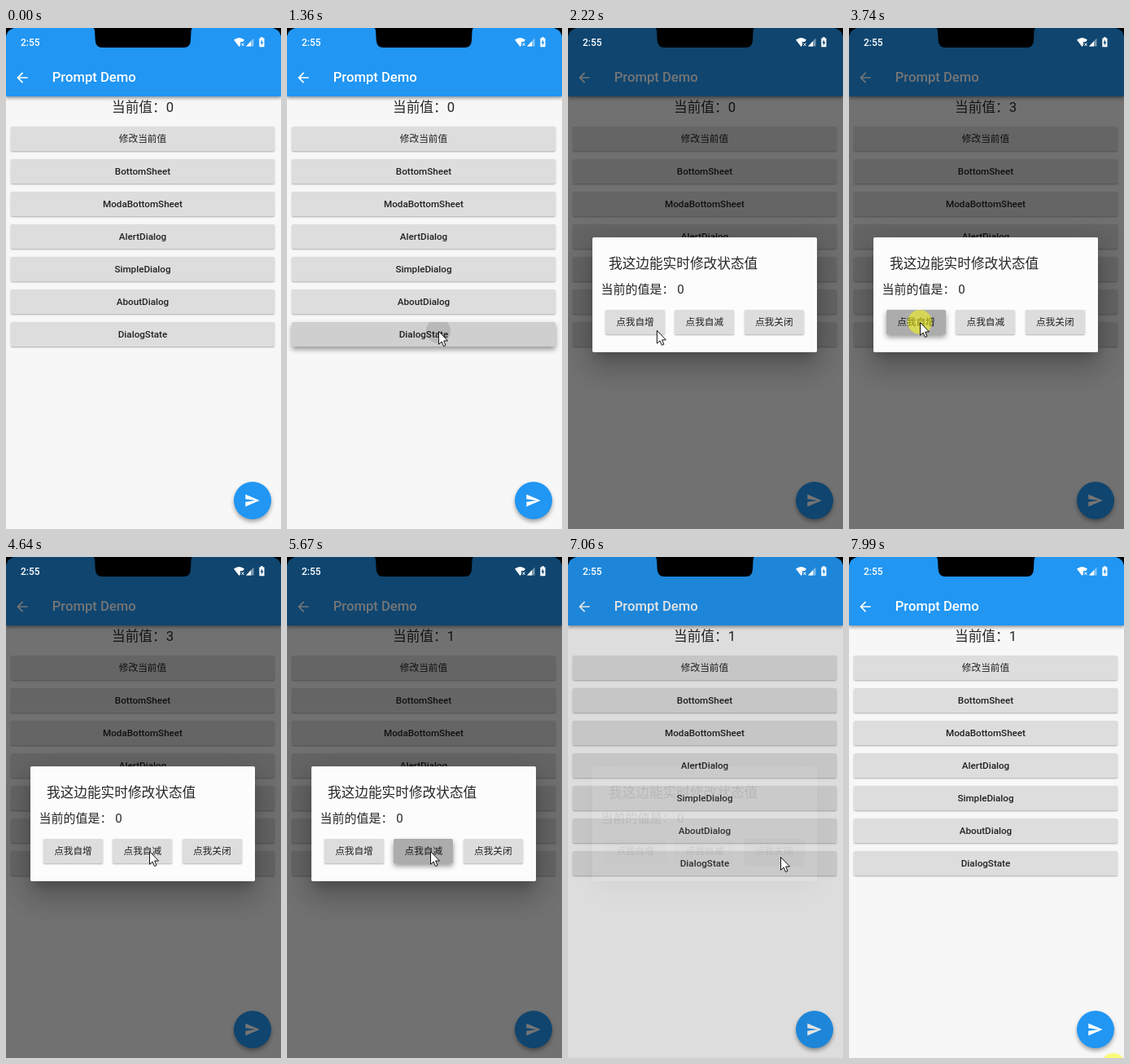
An HTML page for the animation above (8220 ms loop, 338x615 px).

```html
<!DOCTYPE html>
<html lang="zh-CN">
<head>
<meta charset="utf-8">
<title>Prompt Demo</title>
<style>
html, body { margin: 0; width: 100%; height: 100%; overflow: hidden; background: #f7f7f7; }
body { font-family: Roboto, "Noto Sans CJK SC", "Noto Sans CJK", sans-serif; color: rgba(0,0,0,.85); }
#stage { position: relative; width: 338px; height: 615px; overflow: hidden; background: #f7f7f7; }
#stage div, #stage svg { position: absolute; white-space: pre; }
.layer { left: 0; top: 0; width: 338px; height: 615px; }
.bar { left: 0; top: 0; width: 338px; height: 84px; background: #2196f3; box-shadow: 0 2px 4px rgba(0,0,0,.42); }
.title { left: 56.7px; top: 51px; font: 500 16.67px/20px Roboto, sans-serif; color: #fff; }
.big { font-size: 16.67px; line-height: 20px; }
.value { left: 0; width: 336px; top: 87.5px; text-align: center; }
.button { height: 30px; line-height: 30px; font-size: 11.67px; text-align: center;
  border-radius: 1.7px; background: #ddd; overflow: hidden; }
.latin { font-weight: 500; }
.fab { left: 279.6px; top: 556.6px; width: 46.7px; height: 46.7px; border-radius: 50%;
  background: #2196f3; box-shadow: 0 3px 5px rgba(0,0,0,.35); }
.dialog { left: 30px; top: 257px; width: 276px; height: 141px; border-radius: 1.7px; background: #fcfcfc;
  box-shadow: 0 9px 12px -5px rgba(0,0,0,.2), 0 20px 32px 2px rgba(0,0,0,.14), 0 8px 38px 6px rgba(0,0,0,.12); }
.clock { left: 18px; top: 8px; font: 500 12px/20px Roboto, sans-serif; color: #fff; }
.halo { width: 30px; height: 30px; margin: -15px; border-radius: 50%; background: rgba(255,255,0,.5); }
.ripple { border-radius: 50%; background: rgba(0,0,0,.11); }
</style>
</head>
<body>
<div id="stage">
  <div class="big value">当前值：<span id="value">0</span></div>
  <div id="page"></div>
  <div class="bar"></div>
  <svg class="layer" fill="#fff">
    <path transform="translate(10 51) scale(.833)" d="M20 11H7.83l5.59-5.59L12 4l-8 8 8 8 1.41-1.41L7.83 13H20z"/>
  </svg>
  <div class="title">Prompt Demo</div>
  <div class="fab"></div>
  <svg class="layer" fill="#fff">
    <path transform="translate(292.6 570) scale(.833)" d="M2 21l21-9L2 3v7l15 2-15 2z"/>
  </svg>
  <div id="barrier" class="layer" style="background:#000"></div>
  <div id="dialog" class="dialog">
    <div class="big" style="left:20px; top:23px">我这边能实时修改状态值</div>
    <div style="left:10.5px; top:54px; font-size:15px; line-height:20px">当前的值是： 0</div>
  </div>
  <div class="clock">2:55</div>
  <svg class="layer" fill="#fff">
    <path d="M280 14.5Q286.500 9.500 293 14.500L291 17H288V21L286.500 23Z"/>
    <path d="M289.300 18.500l3.200 3.500m0-3.500l-3.200 3.500" stroke="#fff" stroke-width="1"/>
    <path d="M304.500 12.500V22.500H295Z" opacity=".45"/>
    <path d="M301 16.200V22.500H295Z"/>
    <path fill-rule="evenodd" d="M313 12.500V11.300h2.800v1.200H317.500V23.300H311.300V12.500ZM314.900 14l-2.400 4.500h1.500v3.300l2.400-4.500h-1.500z"/>
    <path fill="#000" d="M107.500 0Q109 1 109.200 6L109.700 15Q110.200 24 118.500 24H218.500Q226.500 24 227 15L227.400 6Q227.600 1 229 0Z"/>
    <path fill="#000" d="M0 0H10Q2 2 0 10ZM338 0H328Q336 2 338 10Z"/>
  </svg>
  <div id="halo" class="halo"></div>
  <svg id="cursor" width="14" height="21" style="overflow:visible">
    <path d="M.500 .500V16.300L4.100 13 6.500 18.600 9 17.500 6.700 12H11.500Z" fill="#fff" stroke="#111" stroke-width="1"/>
  </svg>
</div>
<script>
const LOOP = 8220;
const $ = id => document.getElementById(id);
const clamp = v => Math.max(0, Math.min(1, v));
const ramp = (t, from, to) => clamp((t - from) / (to - from));
const within = (t, [from, to]) => t >= from && t < to;

function addButton(parent, label, left, top, width) {
  const button = document.createElement('div');
  button.className = 'button' + (/^[A-Z]/.test(label) ? ' latin' : '');
  button.textContent = label;
  button.style.cssText = `left:${left}px; top:${top}px; width:${width}px`;
  parent.append(button);
  setPress(button, 0, 0);
  return button;
}

function setPress(button, amount, darkness) {
  const shade = 221 * (1 - amount * darkness);
  button.style.backgroundColor = `rgb(${shade},${shade},${shade})`;
  button.style.boxShadow =
    `0 ${1 + 2.5 * amount}px ${2 + 4 * amount}px rgba(0,0,0,${.3 + .1 * amount})`;
}

const pageButtons = ['修改当前值', 'BottomSheet', 'ModaBottomSheet', 'AlertDialog',
  'SimpleDialog', 'AboutDialog', 'DialogState']
  .map((label, i) => addButton($('page'), label, 6, 121 + 40 * i, 324));
const opener = pageButtons.at(-1);
const ripple = document.createElement('div');
ripple.className = 'ripple';
opener.append(ripple);

const dialogButtons = ['点我自增', '点我自减', '点我关闭']
  .map((label, i) => addButton($('dialog'), label, 15.8 + 85.4 * i, 89, 73.3));

// Start times of the pressed look, per dialog button
const presses = [[2870, 3480, 3640], [5050, 5580], [6880]];
// Times at which the counter takes a new value
const counts = [[0, 0], [2920, 1], [3530, 2], [3700, 3], [5100, 2], [5640, 1]];
const halos = [[1050, 1280], [2690, 2870], [3250, 3480], [3540, 3790],
  [4820, 5050], [5400, 5580], [6680, 6880], [7990, LOOP]];

// Pointer path: time, x, y
const path = [[80, 232, 430], [520, 200, 343], [820, 186, 372], [1690, 186, 372],
  [1940, 150, 421], [2220, 109, 371], [2400, 87, 361], [3950, 87, 361],
  [4290, 148, 361], [4640, 176, 361], [5690, 176, 361], [5890, 243, 434],
  [6470, 261, 368], [7120, 261, 368], [7640, 325, 624]];

function slope(i, axis) {
  const before = path[i - 1], here = path[i], after = path[i + 1];
  if (!before || !after || before[axis] === here[axis] || after[axis] === here[axis]) return 0;
  return (after[axis] - before[axis]) / (after[0] - before[0]);
}

// Cubic Hermite interpolation along the pointer path
function pointer(t, axis) {
  const next = path.findIndex(p => p[0] > t);
  if (next < 0) return path.at(-1)[axis];
  if (next === 0) return path[0][axis];
  const a = path[next - 1], b = path[next], span = b[0] - a[0];
  const u = (t - a[0]) / span, ease = u * u * (3 - 2 * u);
  return a[axis] + (b[axis] - a[axis]) * ease
    + span * u * (1 - u) * ((1 - u) * slope(next - 1, axis) - u * slope(next, axis));
}

const pressAmount = (t, start) => ramp(t, start, start + 50) * (1 - ramp(t, start + 130, start + 230));

function render(t) {
  const x = pointer(t, 1), y = pointer(t, 2);
  $('cursor').style.transform = `translate(${x}px,${y}px)`;
  $('cursor').style.visibility = t < 80 ? 'hidden' : 'visible';
  $('halo').style.transform = `translate(${x}px,${y}px)`;
  $('halo').style.visibility = halos.some(h => within(t, h)) ? 'visible' : 'hidden';

  $('value').textContent = counts.findLast(c => t >= c[0])[1];

  const shown = ramp(t, 1440, 1560) * (1 - ramp(t, 6940, 7090));
  $('barrier').style.opacity = .54 * shown;
  $('dialog').style.opacity = shown ** 1.5;

  setPress(opener, ramp(t, 1270, 1340) * (1 - ramp(t, 1460, 1560)), .065);
  const radius = within(t, [1280, 1560]) ? .18 * (t - 1280) : 0;
  ripple.style.cssText = `left:${180 - radius}px; top:${11 - radius}px;
    width:${2 * radius}px; height:${2 * radius}px; opacity:${1 - ramp(t, 1460, 1560)}`;

  dialogButtons.forEach((button, i) =>
    setPress(button, Math.max(...presses[i].map(start => pressAmount(t, start))), .22));
}

function frame() {
  render(performance.now() % LOOP);
  requestAnimationFrame(frame);
}
frame();
</script>
</body>
</html>
```
